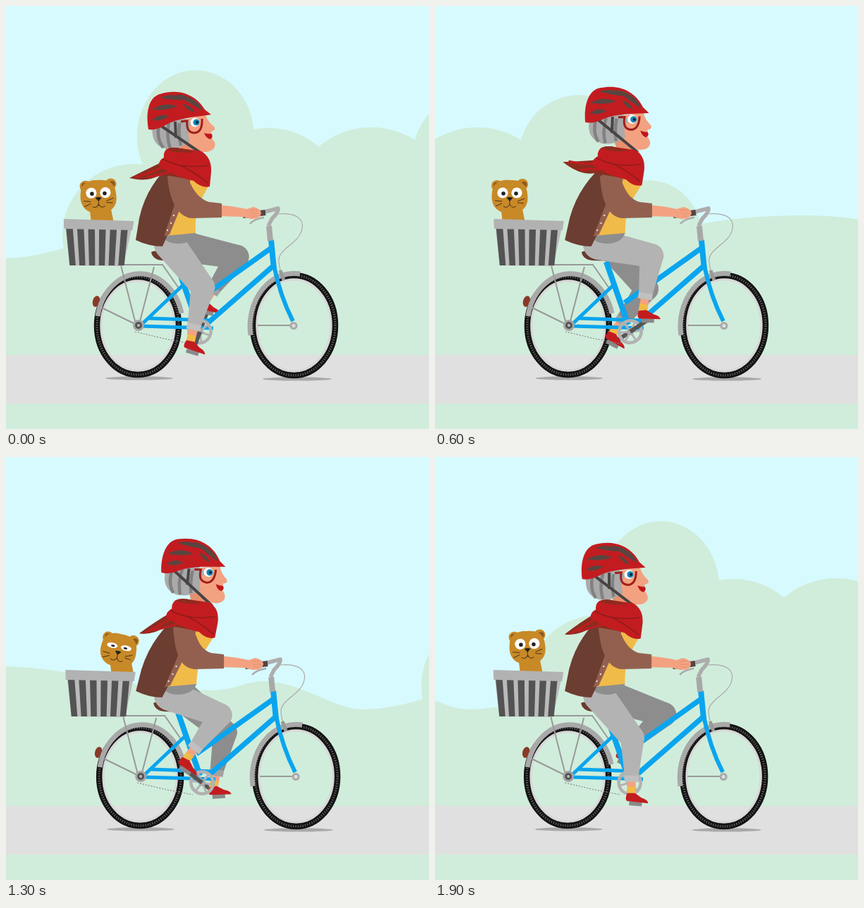
Recreate the animation shown at these times as an HTML page. Size 600 px wide and 600 px high, loop 2 s.

```html
<!DOCTYPE html>
<html lang="en">
<head>
<meta charset="utf-8">
<title>Cyclist with cat</title>
<style>
  html, body { margin: 0; width: 100%; height: 100%; overflow: hidden; background: #d7faff; }
  svg { display: block; width: 100%; height: 100%; }
</style>
</head>
<body>
<svg viewBox="0 0 600 600" fill="none">
  <defs>
    <g id="land" fill="#d0eddb">
      <circle cx="181" cy="325" r="101"/>
      <ellipse cx="269" cy="185" rx="83" ry="94"/>
      <circle cx="372" cy="283" r="110"/>
      <circle cx="518" cy="287" r="115"/>
      <circle cx="663" cy="212" r="86"/>
      <circle cx="759" cy="324" r="77"/>
      <path d="M80 500V345L180 300L269 270H750L830 310C900 296 1000 293 1060 303C1140 313 1190 331 1280 331
        C1320 331 1330 318 1357 318C1400 318 1440 345 1480 356C1510 362 1560 352 1600 338V500Z"/>
    </g>
  </defs>

  <rect width="600" height="600" fill="#d7faff"/>
  <g id="scroll"><use href="#land"/><use href="#land" x="-1501"/><use href="#land" x="1501"/></g>
  <rect y="495" width="600" height="70" fill="#e0e0e0"/>
  <rect y="564" width="600" height="36" fill="#d0eddb"/>

  <g id="shade" fill="#a9a9a9">
    <ellipse cx="189" cy="528" rx="48" ry="2.6"/>
    <ellipse cx="413" cy="529" rx="49" ry="2.6"/>
  </g>

  <g id="wheels"></g>
  <g id="far"></g>

  <g id="bike">
    <ellipse cx="128" cy="419" rx="5" ry="8" fill="#8a3a28" transform="rotate(15 128 419)"/>
    <path d="M130 440A61 74.5 0 0 1 249 436" stroke="#a9a9a9" stroke-width="7"/>
    <path d="M347 467A62 75 0 0 1 417 380" stroke="#a9a9a9" stroke-width="7"/>
    <path d="M95 367H222L247 403M163 368L183 447M210 370L190 447M136 428L187 453M357 453H407" stroke="#999" stroke-width="2"/>
    <path d="M183 462L225 472L262 479" stroke="#888" stroke-width="1.2" stroke-dasharray="2 2"/>
    <g stroke="#0aa5ee" stroke-linejoin="round">
      <path d="M376 332L380 373" stroke-width="8"/>
      <path d="M380 368Q389 412 407 447" stroke-width="6"/>
      <path d="M378 342L267 421M381 367L287 449" stroke-width="7.5"/>
      <path d="M241 363L272 452" stroke-width="8"/>
      <path d="M192 452L253 394M192 454L294 457M203 443L292 446" stroke-width="5"/>
    </g>
    <circle cx="188" cy="453" r="8" fill="#a5a5a5"/><circle cx="188" cy="453" r="5" fill="#555"/><circle cx="188" cy="453" r="2" fill="#bbb"/>
    <circle cx="408" cy="453.5" r="5.5" fill="#aaa"/><circle cx="408" cy="453.5" r="2.5" fill="#ddd"/>
    <path d="M206 349C215 344 245 352 268 358Q270 362 262 362L222 361Q208 360 206 349Z" fill="#6b3a2e"/>
    <path d="M373 312L375 333" stroke="#a8a8a8" stroke-width="8"/>
    <path d="M372 312L377 302Q387 292 386 287L363 293" stroke="#adadad" stroke-width="5.5" stroke-linejoin="round"/>
    <path d="M336 297L368 293" stroke="#544" stroke-width="8"/>
    <path d="M346 309Q352 302 366 300" stroke="#aaa" stroke-width="2.5"/>
    <path d="M386 295C412 293 423 302 420 316C416 338 384 344 387 364Q389 376 392 384" stroke="#aaa" stroke-width="1.2"/>
    <path d="M389 375L394 389" stroke="#999" stroke-width="5"/>
    <g id="ring" stroke="#b2b2b2">
      <ellipse rx="15.5" ry="16" stroke-width="4.5"/>
      <path d="M-14 0H14M-7 -13L7 13M7 -13L-7 13" stroke-width="3"/>
      <circle r="5" fill="#aaa" stroke="none"/>
    </g>
  </g>

  <g id="cat">
    <path d="M-14 5H15L22 40H-10Z" fill="#c88927"/>
    <g id="face">
      <circle cx="-18" cy="-13" r="8" fill="#c88927"/><circle cx="18" cy="-15" r="8" fill="#c88927"/>
      <circle cx="-19" cy="-14" r="4" fill="#8a5426"/><circle cx="20" cy="-15" r="4" fill="#8a5426"/>
      <path d="M-25 -4C-24 -18 -12 -22 0 -21C14 -22 24 -17 25 -2C28 17 18 26 0 26C-18 26 -28 15 -25 -4Z" fill="#c88927"/>
      <g id="eyes">
        <circle cx="-10" r="7.6" fill="#fff"/><circle cx="10" r="7.6" fill="#fff"/>
        <circle cx="-9" cy="1" r="2.8" fill="#222"/><circle cx="9" cy="1" r="2.8" fill="#222"/>
      </g>
      <path id="lids" d="M-15 -3Q-10 1 -5 -3M5 -3Q10 1 15 -3" stroke="#5a3818" stroke-width="1.4"/>
      <path d="M-4.5 4Q0 2 4.5 4L0 9Z" fill="#222"/>
      <path d="M0 8V13Q-3 20 -9 16M0 13Q3 20 9 16M-11 9L-21 8M-11 12L-20 16M11 9L21 5M11 11L20 12" stroke="#4a331c" stroke-width="1"/>
    </g>
  </g>

  <g id="basket">
    <path d="M85 314L91 368L167 369L179 315Z" fill="#bababa"/>
    <g id="slats" fill="#535353"></g>
    <path d="M82.5 302L182 305L180 318L83 316Z" fill="#b2b2b2"/>
  </g>

  <g id="near"></g>

  <g id="torso">
    <path d="M220 322H271Q267 336 248 337Q228 338 220 322Z" fill="#8e8e8e"/>
    <path d="M250 240L290 254L280 272Q269 290 271 322L226 326Z" fill="#f1bb49"/>
    <path d="M224 236Q199 264 191 301L186 332Q205 341 224 341L242 300L250 240Z" fill="#6c3d31"/>
    <path d="M240 285L226 327L234 324L248 290L264 246L254 240Z" fill="#93604f"/>
    <g fill="#e9dcd0"><circle cx="240" cy="297" r="1.2"/><circle cx="236" cy="308" r="1.2"/><circle cx="231" cy="318" r="1.2"/><circle cx="259" cy="252" r="1.2"/></g>
  </g>
  <g id="arm">
    <path d="M300 282Q325 284 341 288L351 285Q362 288 362 294Q360 303 347 302L336 299L300 298Z" fill="#f3a281"/>
    <path d="M346 290L357 289M347 294L358 294M348 298L356 298" stroke="#e08d6a" stroke-width="0.8"/>
    <path id="sleeve" fill="#93604f"/>
  </g>

  <g id="head">
    <path d="M240 185L252 214H276V190Z" fill="#e6906e"/>
    <path d="M245 163L283 154Q286 164 295 171Q299 176 291 178L292 188Q298 194 296 200Q292 208 279 207Q262 206 252 192Z" fill="#f3a281"/>
    <path d="M208 168Q204 198 228 203Q248 204 261 191Q255 181 263 166L250 157Z" fill="#aaa"/>
    <path d="M217 168Q213 188 223 201M231 166Q227 185 233 202M246 166Q244 180 248 198" stroke="#818181" stroke-width="4.5"/>
    <path d="M217 168L280 211M240 164L241 187" stroke="#484443" stroke-width="4"/>
    <circle cx="268" cy="165" r="6.5" fill="#fff"/><circle cx="270" cy="165" r="4.6" fill="#1687b4"/><circle cx="271" cy="165" r="2" fill="#123"/>
    <path d="M248 164L257 163Q255 180 268 180Q279 178 278 160" stroke="#a01f1b" stroke-width="3"/>
    <path d="M281 180Q287 182 291 181Q295 185 290 189Q284 188 281 180Z" fill="#c0171c"/>
    <path d="M202 175C198 152 202 130 218 125C248 116 270 127 282 147L291 154C264 158 244 159 226 169Q212 177 202 175Z" fill="#c31c20"/>
    <g fill="#594540">
      <path d="M218 130Q240 121 256 133Q238 134 218 130Z"/>
      <path d="M207 147Q224 135 243 142Q228 149 207 147Z"/>
      <path d="M207 162Q217 152 231 156Q222 164 207 162Z"/>
      <path d="M241 125Q270 128 279 148Q262 140 241 125Z"/>
      <path d="M251 139Q263 141 268 151Q257 149 251 139Z"/>
    </g>
  </g>

  <g id="scarf">
    <path id="tail" fill="#8b2c1f"/>
    <path id="fold" stroke="#bd1d1f" stroke-width="3"/>
    <path d="M228 203Q235 199 248 202L277 206Q292 215 291 235L289 256Q278 259 266 248Q243 243 217 227Q216 219 224 215Q223 207 228 203Z" fill="#c31c20"/>
    <path d="M229 204Q235 199 248 202L268 207Q248 210 229 204Z" fill="#8b2c1f"/>
    <path d="M222 217Q250 232 287 226M247 226Q270 237 286 251" stroke="#8f1c1b" stroke-width="1.6"/>
  </g>
</svg>

<script>
const NS = 'http://www.w3.org/2000/svg';
const $ = id => document.getElementById(id);
const set = (el, attrs) => { for (const k in attrs) el.setAttribute(k, attrs[k]); return el; };
const add = (parent, tag, attrs) => parent.appendChild(set(document.createElementNS(NS, tag), attrs || {}));
const move = (id, x, y = 0) => set($(id), { transform: `translate(${x} ${y})` });
const rad = d => d * Math.PI / 180;

const SCROLL = 76.3, LEAN = 0.095, THIGH = 77, SHIN = 80;
const SWAY = [0, 0.6, 1, 0.98, 0.36];
const BOB = [0, -1, -3, -6, -7, -8, -7, -2.5, -0.5, 0];
const TAIL = [244, 246, 248, 250, 246, 240, 223, 224, 230, 250];
// step, x, y, tilt, eye opening
const CAT = [
  [0, 131, 268, -2, 1], [3, 122, 280, -46, 0], [6, 106, 268, 0, 1], [8, 141, 277, 30, 0.25],
  [11, 167, 278, 28, 0], [15, 153, 266, -4, 1], [19, 131, 268, -2, 1], [20, 131, 268, -2, 1]
];

// Wheels
const treads = [[187, 453.5, 58, 69.5], [408.5, 453, 58.5, 71]].map(([cx, cy, rx, ry]) => {
  const ring = (stroke, w, inset) => add($('wheels'), 'ellipse',
    { cx, cy, rx: rx - inset, ry: ry - inset, stroke, 'stroke-width': w });
  ring('#d8d8d8', 4, 5.5);
  ring('#141414', 8.5, 0);
  return set(ring('#777', 3, 0), { 'stroke-dasharray': '1 2.4' });
});

// Basket slats
for (let i = 0; i < 6; i++) {
  const a = 86 + i * 15.6, b = 91 + i * 13.8;
  add($('slats'), 'path', { d: `M${a} 315H${a + 9.5}L${b + 8.5} 368H${b}Z` });
}

// Limb with round ends of two sizes
function limb([ax, ay], ra, [bx, by], rb) {
  const d = Math.hypot(bx - ax, by - ay), nx = (ay - by) / d, ny = (bx - ax) / d;
  return `M${ax + nx * ra} ${ay + ny * ra}L${bx + nx * rb} ${by + ny * rb}` +
    `A${rb} ${rb} 0 0 0 ${bx - nx * rb} ${by - ny * rb}L${ax - nx * ra} ${ay - ny * ra}` +
    `A${ra} ${ra} 0 0 0 ${ax + nx * ra} ${ay + ny * ra}Z`;
}

function knee([hx, hy], [fx, fy]) {
  const dx = fx - hx, dy = fy - hy, d = Math.min(Math.hypot(dx, dy), THIGH + SHIN - 0.1);
  const a = (THIGH * THIGH - SHIN * SHIN + d * d) / (2 * d);
  const h = Math.sqrt(THIGH * THIGH - a * a);
  return [hx + (dx * a + dy * h) / d, hy + (dy * a - dx * h) / d];
}

function makeLeg(id, cloth, hem, hip) {
  const g = $(id);
  const line = (stroke, w) => add(g, 'path', { stroke, 'stroke-width': w });
  const crank = line('#555', 6), pedal = line('#8a8a8a', 6);
  const skin = line('#f3a281', 12), sock = line('#f1bb49', 12);
  const shoe = add(g, 'path', { fill: '#c31c20', d: 'M-13 -13Q-16 -3 -12 -2L18 -1Q17 -6 8 -8L-2 -14Z' });
  const shin = add(g, 'path', { fill: cloth }), thigh = add(g, 'path', { fill: cloth });
  const cuff = line(hem, 20);
  return (deg, bx) => {
    const a = rad(deg), c = [bx + 275, 462];
    const p = [c[0] + 30 * Math.sin(a), c[1] - 30 * Math.cos(a)];
    const tilt = 14 + 20 * Math.cos(rad(deg - 282)), r = rad(tilt);
    const ankle = [p[0] - 7 * Math.cos(r) + 12 * Math.sin(r), p[1] - 7 * Math.sin(r) - 12 * Math.cos(r)];
    const k = knee(hip, ankle);
    const at = f => [k[0] + (ankle[0] - k[0]) * f, k[1] + (ankle[1] - k[1]) * f];
    const seg = (el, u, v) => set(el, { d: `M${u}L${v}` });
    const foot = { transform: `translate(${p}) rotate(${tilt})` };
    seg(crank, c, p);
    set(pedal, { d: 'M-9 1H9', ...foot });
    seg(skin, at(0.7), ankle);
    seg(sock, at(0.87), at(1.06));
    set(shoe, foot);
    set(thigh, { d: limb(hip, 22, k, 17) });
    set(shin, { d: limb(k, 17, at(0.66), 10) });
    seg(cuff, at(0.67), at(0.78));
  };
}
const farLeg = makeLeg('far', '#8d8d8d', '#a2a2a2', [252, 341]);
const nearLeg = makeLeg('near', '#b3b3b3', '#c0c0c0', [232, 338]);

function catPose(n) {
  const i = CAT.findIndex(k => k[0] > n), a = CAT[i - 1], b = CAT[i];
  return a.map((v, j) => v + (b[j] - v) * (n - a[0]) / (b[0] - a[0]));
}

function draw(n) {
  const s = SWAY[n % 5], bob = BOB[n % 10], bx = 3.2 * s, turn = 200 + 36 * n;

  move('scroll', -SCROLL * n);
  move('shade', 2 * s);
  move('wheels', bx);
  move('bike', bx);
  move('basket', 2.5 * s - 0.7);
  treads.forEach(t => set(t, { 'stroke-dashoffset': -n * 1.3 }));
  set($('ring'), { transform: `translate(275 462) rotate(${turn})` });
  farLeg(turn + 180, bx);
  nearLeg(turn, bx);

  const [, cx, cy, tilt, open] = catPose(n);
  move('cat', cx, cy);
  set($('face'), { transform: `rotate(${tilt})` });
  set($('eyes'), { transform: `translate(0 -3) scale(1 ${open})` });
  set($('lids'), { opacity: open < 0.3 ? 1 : 0 });

  const lean = (dx, dy) => `matrix(1 0 ${-LEAN * s} 1 ${LEAN * s * 335 + dx} ${dy})`;
  set($('torso'), { transform: lean(-2, 0) });
  set($('scarf'), { transform: lean(0, bob * 0.6 + 4 * s) });
  set($('head'), { transform: `translate(${14.5 * s} ${bob}) rotate(${8.5 * s} 240 200)` });

  const sx = 5 * s;
  move('arm', bx);
  set($('sleeve'), { d: `M${229 + sx} 242Q${239 + sx} 232 ${257 + sx} 240C${263 + sx} 258 272 273 288 278L306 280V300L264 301C240 299 ${231 + sx} 268 ${229 + sx} 242Z` });

  const ty = TAIL[n % 10], tx = 175 + Math.max(0, ty - 244), my = 139 + ty * 0.4;
  set($('tail'), { d: `M245 212L224 220Q202 ${my - 6} ${tx} ${ty}Q200 ${my + 14} 221 239L262 246Z` });
  set($('fold'), { d: `M232 224Q208 ${my} ${tx + 8} ${ty - 1}M243 233Q216 ${my + 4} 200 ${my + 6}` });
}

function tick(now) {
  draw(Math.floor(now % 2000 / 100));
  requestAnimationFrame(tick);
}
draw(0);
requestAnimationFrame(tick);
</script>
</body>
</html>
```
